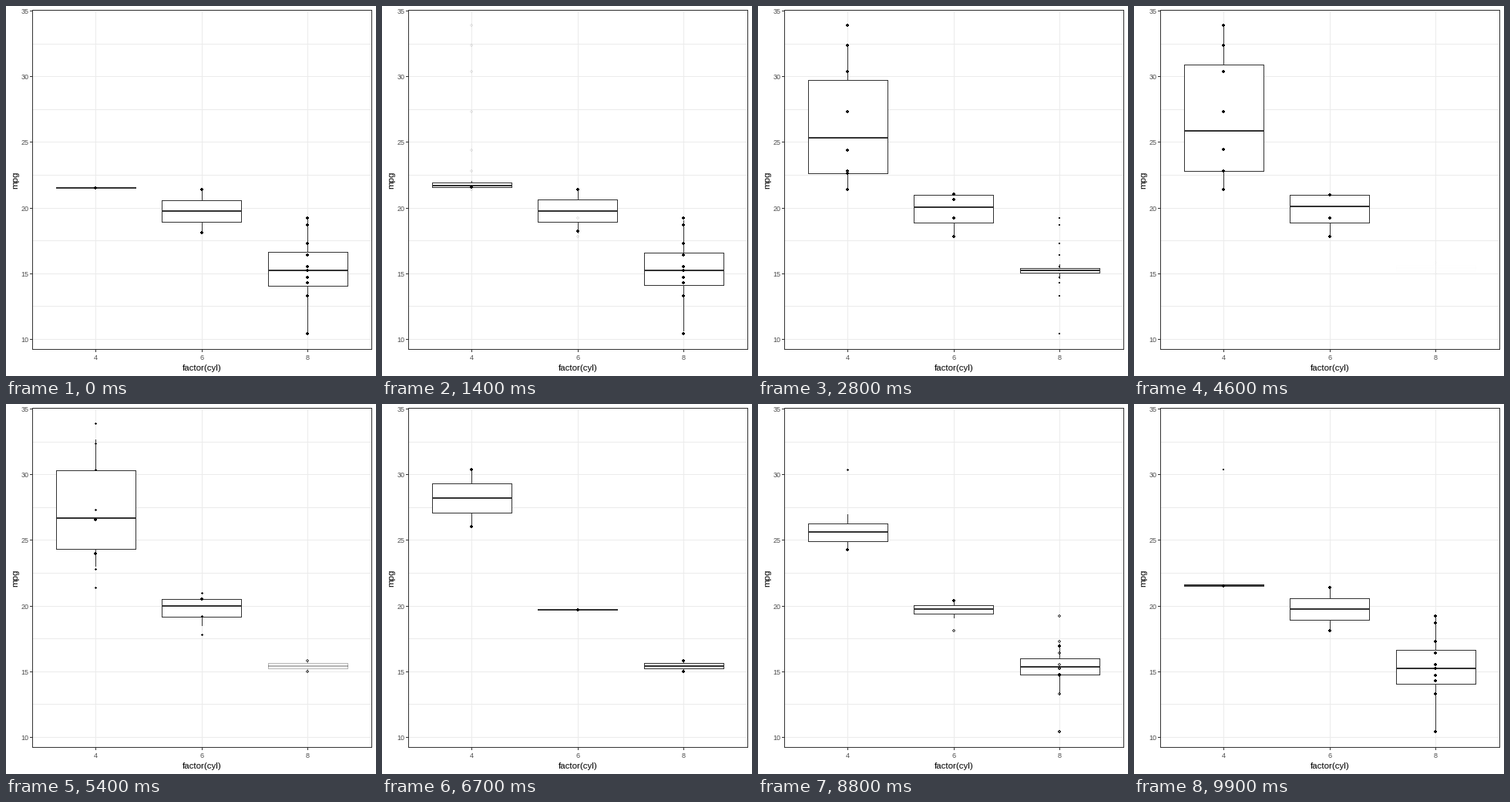
A matplotlib script for the animation above (10 s loop, 480 by 480 pixels).

```python
import math
from itertools import zip_longest

import numpy as np
import matplotlib.pyplot as plt
from matplotlib.animation import FuncAnimation
from matplotlib.collections import PolyCollection

SIZE = 480
PX = 0.72  # points per pixel at 100 dpi
GREY20 = (0.2, 0.2, 0.2)
GREY30 = "#4D4D4D"
GREY92 = (235 / 255,) * 3
WHITE = (1, 1, 1)
BLACK = (0, 0, 0)

LEFT, RIGHT, TOP, BOTTOM = 34.2, 474.5, 5.5, 445.5
UNIT_X = (RIGHT - LEFT) / 3.2
UNIT_Y = (BOTTOM - TOP) / 25.85

# mpg values by gear, then by number of cylinders
GEARS = [
    {4: [21.5],
     6: [21.4, 18.1],
     8: [18.7, 14.3, 16.4, 17.3, 15.2, 10.4, 10.4, 14.7, 15.5, 15.2, 13.3, 19.2]},
    {4: [22.8, 24.4, 22.8, 32.4, 30.4, 33.9, 27.3, 21.4],
     6: [21.0, 21.0, 19.2, 17.8],
     8: []},
    {4: [26.0, 30.4],
     6: [19.7],
     8: [15.8, 15.0]},
]
CYLS = (4, 6, 8)
# first frame and length of each transition
MOVES = [(12, 22), (46, 22), (80, 21)]


def px_x(pos):
    return LEFT + (pos - 0.4) * UNIT_X


def px_y(mpg):
    return TOP + (35.075 - mpg) * UNIT_Y


def ease(p):
    return (1 - math.cos(math.pi * p)) / 2


def progress(frame):
    """Return the two states being blended and the eased fraction."""
    state = 0
    for i, (start, length) in enumerate(MOVES):
        step = frame - start + 1
        if step <= 0:
            break
        if step < length:
            return i, (i + 1) % 3, ease(step / length)
        state = (i + 1) % 3
    return state, state, 0.0


class Canvas:
    """Collects pixel-aligned rectangles for one PolyCollection."""

    def __init__(self):
        self.verts, self.colors = [], []

    def rect(self, x, y, w, h, color, alpha=1.0):
        if w > 0 and h > 0:
            self.verts.append([(x, y), (x + w, y), (x + w, y + h), (x, y + h)])
            self.colors.append((*color, alpha))

    def frame(self, x0, y0, x1, y1, color, alpha=1.0):
        self.rect(x0, y0, x1 - x0 + 1, 1, color, alpha)
        if y1 > y0:
            self.rect(x0, y1, x1 - x0 + 1, 1, color, alpha)
            self.rect(x0, y0 + 1, 1, y1 - y0 - 1, color, alpha)
            self.rect(x1, y0 + 1, 1, y1 - y0 - 1, color, alpha)

    def box(self, pos, stats, alpha=1.0):
        low, q1, mid, q3, high = (int(px_y(v)) for v in stats)
        xc = int(px_x(pos))
        x0, x1 = int(px_x(pos - 0.375)), int(px_x(pos + 0.375))
        self.rect(xc, high, 1, q3 - high, GREY20, alpha)
        self.rect(xc, q1 + 1, 1, low - q1, GREY20, alpha)
        self.rect(x0 + 1, q3 + 1, x1 - x0 - 1, q1 - q3 - 1, WHITE, alpha)
        self.frame(x0, q3, x1, q1, GREY20, alpha)
        self.rect(x0, mid - 1, x1 - x0 + 1, 2, GREY20, alpha)

    def dot(self, pos, mpg, scale=1.0, alpha=1.0):
        radius = 0.375 * (scale * 1.5 * 72.27 / 25.4 + 0.945)
        d = max(2, int(2 * radius + 0.5))
        x, y = int(px_x(pos)) - d // 2, int(px_y(mpg)) - d // 2
        if d == 2:
            self.rect(x, y, 2, 2, BLACK, alpha)
            return
        m = d - 2
        rim = 1 - (1 - alpha) ** 2  # outline drawn over the fill
        self.rect(x + 1, y + 1, m, m, BLACK, alpha)
        self.rect(x + 1, y, m, 1, BLACK, rim)
        self.rect(x + 1, y + d - 1, m, 1, BLACK, rim)
        self.rect(x, y + 1, 1, m, BLACK, rim)
        self.rect(x + d - 1, y + 1, 1, m, BLACK, rim)


def box_stats(values):
    return np.percentile(values, [0, 25, 50, 75, 100]) if values else None


def blend(a, b, t):
    return a + (b - a) * t


def paint(frame):
    a, b, t = progress(frame)
    canvas = Canvas()
    for pos, cyl in enumerate(CYLS, 1):
        old, new = box_stats(GEARS[a][cyl]), box_stats(GEARS[b][cyl])
        if old is not None and new is not None:
            canvas.box(pos, blend(old, new, t))
        elif old is not None:
            canvas.box(pos, blend(old, old[2], t))  # collapse to the median
        elif new is not None:
            canvas.box(pos, new, t)
    for pos, cyl in enumerate(CYLS, 1):
        for old, new in zip_longest(GEARS[a][cyl], GEARS[b][cyl]):
            if new is None:
                canvas.dot(pos, old, scale=1 - t)
            elif old is None:
                canvas.dot(pos, new, alpha=t)
            else:
                canvas.dot(pos, blend(old, new, t))
    return canvas


def collection(canvas, z):
    return PolyCollection(canvas.verts, facecolors=canvas.colors,
                          edgecolors="none", linewidths=0, zorder=z)


fig = plt.figure(figsize=(4.8, 4.8), dpi=100, facecolor="white")
ax = fig.add_axes([0, 0, 1, 1])
ax.set_xlim(0, SIZE)
ax.set_ylim(SIZE, 0)
ax.axis("off")


def label(x, y, text, size, color, ha="center", rotation=0):
    ax.text(x, y, text, fontsize=size * PX, color=color, ha=ha, va="baseline",
            rotation=rotation, family="Liberation Sans")


grid, border = Canvas(), Canvas()
for mpg in np.arange(10, 35.1, 2.5):
    y = int(px_y(mpg))
    grid.rect(34, y, 441, 1, GREY92)
    if mpg % 5 == 0:
        border.rect(31, y, 3, 1, GREY20)
        label(29.5, y + 4, f"{mpg:.0f}", 9, GREY30, ha="right")
for pos, cyl in enumerate(CYLS, 1):
    x = int(px_x(pos))
    grid.rect(x, 5, 1, 441, GREY92)
    border.rect(x, 446, 1, 3, GREY20)
    label(x + 0.5, 459, str(cyl), 9, GREY30)
border.frame(34, 5, 474, 445, GREY20)
ax.add_collection(collection(grid, 1), autolim=False)
ax.add_collection(collection(border, 3), autolim=False)
label(254.5, 473, "factor(cyl)", 11.5, "black")
ax.text(15.5, 225.5, "mpg", fontsize=11.5 * PX, color="black", rotation=90,
        rotation_mode="anchor", ha="center", va="baseline",
        family="Liberation Sans")

marks = collection(paint(0), 2)
ax.add_collection(marks, autolim=False)


def update(frame):
    canvas = paint(frame)
    marks.set_verts(canvas.verts)
    marks.set_facecolor(canvas.colors)
    return (marks,)


anim = FuncAnimation(fig, update, frames=100, interval=100, repeat=True,
                     repeat_delay=0, blit=False)
plt.show()
```
